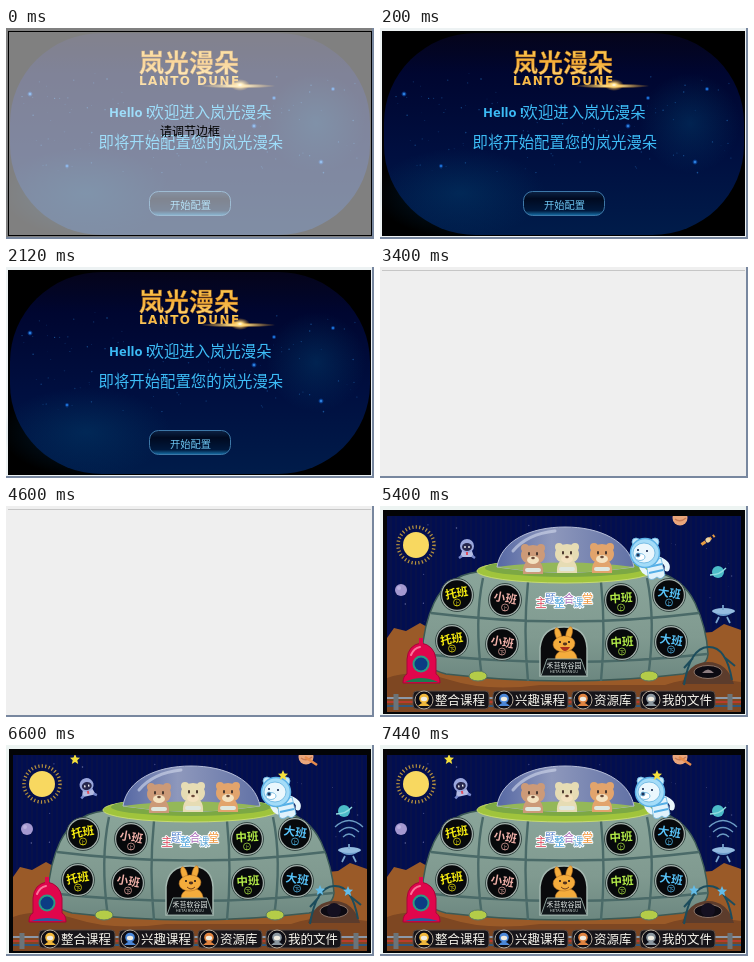
An HTML page that plays this animation: 368 px wide and 211 px high, repeating every 8 s.

```html
<!DOCTYPE html>
<html lang="zh">
<head>
<meta charset="utf-8">
<title>开始配置</title>
<style>
html, body { margin: 0; width: 100%; height: 100%; overflow: hidden; background: #efefef; }
svg { display: block; width: 100%; height: 100%; }
text { font-family: "Noto Sans CJK SC", "Noto Sans CJK", sans-serif; }
.mid { text-anchor: middle; }
.bold { font-weight: 700; }
.wide { font: 700 12px "DejaVu Sans", sans-serif; letter-spacing: 1.4px; }
.intro, .veil, .world, .poseA, .poseB { animation: 8s step-end infinite; }
.intro { animation-name: intro; }
.veil { animation-name: veil; }
.world { animation-name: world; }
.poseA { animation-name: poseA; }
.poseB { animation-name: poseB; }
@keyframes intro { 0% { opacity: 1 } 42.5%, 100% { opacity: 0 } }
@keyframes veil { 0% { opacity: 1 } 2.5%, 100% { opacity: 0 } }
@keyframes world { 0% { opacity: 0 } 67.5%, 100% { opacity: 1 } }
@keyframes poseA { 0% { opacity: 1 } 82.5%, 100% { opacity: 0 } }
@keyframes poseB { 0% { opacity: 0 } 82.5%, 100% { opacity: 1 } }
</style>
</head>
<body>
<svg viewBox="0 0 368 211" preserveAspectRatio="none">
<defs>
  <linearGradient id="night" x2="0" y2="1">
    <stop offset="0" stop-color="#05041a"/><stop offset=".2" stop-color="#000630"/>
    <stop offset=".6" stop-color="#000f40"/><stop offset="1" stop-color="#001c4a"/>
  </linearGradient>
  <radialGradient id="haze"><stop stop-color="#023a68" stop-opacity=".5"/><stop offset="1" stop-color="#023a68" stop-opacity="0"/></radialGradient>
  <radialGradient id="spark"><stop stop-color="#fff"/><stop offset=".25" stop-color="#ffe08a"/><stop offset="1" stop-color="#f0a020" stop-opacity="0"/></radialGradient>
  <radialGradient id="glow"><stop stop-color="#8cd0ff"/><stop offset=".3" stop-color="#1468d0"/><stop offset="1" stop-color="#0a3c98" stop-opacity="0"/></radialGradient>
  <linearGradient id="gold" x2="0" y2="1"><stop stop-color="#ffd960"/><stop offset=".55" stop-color="#f4ad38"/><stop offset="1" stop-color="#ffdb7c"/></linearGradient>
  <linearGradient id="key" x2="0" y2="1"><stop stop-color="#0c2244"/><stop offset=".3" stop-color="#000a20"/><stop offset=".8" stop-color="#00183c"/><stop offset="1" stop-color="#1670a8"/></linearGradient>
  <linearGradient id="hull" x2="0" y2="1"><stop stop-color="#8aa59a"/><stop offset=".6" stop-color="#809a90"/><stop offset="1" stop-color="#6c8780"/></linearGradient>
  <linearGradient id="glass"><stop stop-color="#5668a4"/><stop offset=".4" stop-color="#8e98bc"/><stop offset="1" stop-color="#6272a6"/></linearGradient>
  <pattern id="stripes" width="5" height="8" patternUnits="userSpaceOnUse"><rect width="5" height="8" fill="#020e50"/><path d="M1 0V8" stroke="#0c1444"/></pattern>
  <clipPath id="screen"><rect x="7" y="10" width="354" height="196"/></clipPath>
  <g id="pal">
    <circle cx="-8" cy="-9" r="4"/><circle cx="8" cy="-9" r="4"/>
    <path d="M-10 17Q-11 3 0 3T10 17Z"/><ellipse cy="-2" rx="12" ry="10"/>
    <ellipse cy="3" rx="6" ry="4" fill="#f4e2c0"/>
    <path d="M-4-4v1.5M4-4v1.5" stroke="#4a382e" stroke-width="2" stroke-linecap="round"/>
    <ellipse cy="1" rx="1.8" ry="1.2" fill="#6a4a38"/>
    <path d="M-6 13h12" stroke="#dfe8e0" stroke-width="4" stroke-linecap="round"/>
  </g>
  <g id="snow" stroke="#68b4e0" stroke-width=".8">
    <path d="M-3 10Q-5 16 2 20M14 6Q24 10 22 16" fill="none" stroke="#e8f6fc" stroke-width="5" stroke-linecap="round"/>
    <path d="M1 9L16 5L20 22Q16 28 12 24L9 26Q3 28 3 22Z" fill="#e0f2fb"/>
    <path d="M3 14L17 11M4 20L18 17" stroke="#54aee6" stroke-width="2"/>
    <circle cx="-9" cy="-11" r="4" fill="#c4e8fa"/><circle cx="10" cy="-11" r="4" fill="#c4e8fa"/>
    <circle r="14.5" fill="#a4dcf8" stroke="#5cb2e6" stroke-width="1.5"/>
    <ellipse cx="-1" rx="11" ry="10" fill="#eaf7fd"/>
    <ellipse cx="-5" cy="4" rx="5" ry="3.5" fill="#fff"/>
    <circle cx="-7" cy="2" r="2" fill="#20345a"/><path d="M-7-4v2M2-3v2" stroke="#20345a" stroke-width="1.7"/>
  </g>
  <g id="pilot">
    <path d="M-5 3H5L7 9H-7Z" fill="#b4bce4"/><path d="M-5 8l-3 2M5 8l3 2" stroke="#7888cc" stroke-width="2.5"/>
    <circle cy="-2" r="7" fill="#9aa6dc"/><ellipse cy="-1" rx="5" ry="4" fill="#26264c"/>
    <path d="M-2-2v2M2-2v2" stroke="#fff" stroke-width="1.3"/><path d="M0 4v3" stroke="#e05060" stroke-width="2"/>
  </g>
  <path id="star" d="M0-5L1.5-1.5 5-1.2 2.3 1.2 3.2 5 0 3-3.2 5-2.3 1.2-5-1.2-1.5-1.5Z"/>
</defs>

<rect width="368" height="211" fill="#efefef"/>
<path d="M2 3.5H365" stroke="#c6c6c6"/>

<g class="intro">
  <rect width="366" height="209" fill="#edf2f3"/>
  <rect x="2" y="3" width="363" height="205" fill="#000"/>
  <rect x="4" y="5" width="360" height="202" rx="92" ry="90" fill="url(#night)"/>
  <ellipse cx="80" cy="165" rx="85" ry="45" fill="url(#haze)"/>
  <ellipse cx="310" cy="95" rx="50" ry="50" fill="url(#haze)"/>
  <g id="stars"></g>
  <g fill="url(#gold)">
    <text x="133" y="43.5" font-size="25" class="bold" stroke="#9b5a14" stroke-width=".4">岚光漫朵</text>
    <text x="133" y="56.5" class="wide">LANTO DUNE</text>
  </g>
  <ellipse cx="232" cy="58" rx="38" ry="2.5" fill="url(#spark)"/>
  <ellipse cx="234" cy="57" rx="10" ry="6" fill="url(#spark)"/>
  <g fill="#3cbcf6" font-size="15.4" font-weight="500">
    <text x="103" y="89" style="font:700 13px 'Open Sans',sans-serif">Hello !</text>
    <text x="142.5" y="90">欢迎进入岚光漫朵</text>
    <text x="92.5" y="120">即将开始配置您的岚光漫朵</text>
  </g>
  <rect x="143.5" y="163.5" width="81" height="24" rx="9" fill="url(#key)" stroke="#3d78a8"/>
  <text x="184.5" y="181" class="mid" font-size="10.3" font-weight="500" fill="#6cc4f0">开始配置</text>
</g>

<g class="veil">
  <rect width="366" height="209" fill="#808080"/>
  <rect x="2" y="3" width="363" height="205" fill="#000"/>
  <g id="faded"></g>
  <rect x="2" y="3" width="363" height="205" fill="#fff" opacity=".5"/>
  <rect x="2.5" y="3.5" width="363" height="204" fill="none" stroke="#000"/>
  <text x="184" y="108" class="mid" font-size="12">请调节边框</text>
</g>

<g class="world">
  <rect width="366" height="209" fill="#edf4f2"/>
  <rect x="3" y="4" width="362" height="204" fill="#030406"/>
  <g clip-path="url(#screen)">
    <rect x="7" y="10" width="354" height="196" fill="url(#stripes)"/>
    <g id="dust" fill="#8d91c5"></g>
    <path d="M7 132L14 122 26 125 40 117 60 128H310L332 126 344 118 361 124V207H7Z" fill="#9a5a28"/>
    <path d="M7 172Q33 162 70 174T160 179H285Q315 168 361 176V207H7Z" fill="#7e4722"/>
    <circle cx="36" cy="39" r="18" fill="none" stroke="#b8923c" stroke-width="3.5" stroke-dasharray="1.2 2.3"/>
    <circle cx="36" cy="39" r="13" fill="#f8d860"/>
    <circle cx="300" cy="12" r="7.5" fill="#eaa67c"/><path d="M295 13Q300 17 306 12" fill="none" stroke="#c87c58" stroke-width="1.5"/>
    <circle cx="21" cy="84" r="6" fill="#a498d0"/><circle cx="19" cy="82" r="2" fill="#bcb2e0"/>
    <circle cx="338" cy="66" r="6" fill="#4cbcc8"/><path d="M330 69Q340 69 346 62" fill="none" stroke="#90dce0" stroke-width="1.3"/>

    <!-- ship -->
    <path d="M97 66C78 68 62 80 54 97C47 112 43 130 42 148Q43 162 66 168Q185 182 303 168Q327 162 328 148C327 130 322 112 315 97C307 80 292 68 273 66Z" fill="url(#hull)" stroke="#3c5a56" stroke-width="1.5"/>
    <g fill="none" stroke="#4a6a68" stroke-width="2.4">
      <path d="M51 107Q185 124 319 107M43 148Q185 164 327 148M103 72Q94 115 102 172M148 76Q143 125 148 175M221 76Q226 125 221 175M267 72Q276 115 268 172"/>
    </g>
    <g fill="#b4cc48" stroke="#5a7864"><ellipse cx="98" cy="170" rx="9" ry="5"/><ellipse cx="269" cy="170" rx="9" ry="5"/></g>
    <ellipse cx="185" cy="65" rx="88" ry="12" fill="#a0c43c" stroke="#c8dc70"/>
    <ellipse cx="185" cy="62" rx="80" ry="9" fill="#7ca844"/>
    <path d="M117 61C121 35 150 21 185 21S249 35 254 61Q185 72 117 61Z" fill="url(#glass)" stroke="#b4bcd8"/>
    <path d="M133 45Q147 28 175 25" fill="none" stroke="#ccd4ea" stroke-width="3" opacity=".65" stroke-linecap="round"/>
    <path d="M117 61Q185 52 254 61Q185 72 117 61Z" fill="#94b858"/>
    <use href="#pal" x="153" y="51" fill="#cc9a78"/>
    <use href="#pal" x="187" y="50" fill="#e6dcb4"/>
    <use href="#pal" x="222" y="50" fill="#e2a46c"/>
    <g id="keys"></g>
    <g id="title" class="mid" font-size="11" font-weight="500" paint-order="stroke" stroke="#fff" stroke-width="2" stroke-linejoin="round"></g>

    <!-- door -->
    <path d="M160 170V142Q162 121 184 121T207 142V170Z" fill="#0a0a0c" stroke="#a4b8b0" stroke-width="1.5"/>
    <g fill="#f4ac3c" stroke="#b06c24" stroke-width=".5" transform="rotate(-5 184 138)">
      <path d="M174 154Q173 145 184 144T196 154Z"/>
      <ellipse cx="179" cy="128" rx="3" ry="7" transform="rotate(-12 179 128)"/><ellipse cx="190" cy="128" rx="3" ry="7" transform="rotate(20 190 128)"/>
      <ellipse cx="184" cy="138" rx="11" ry="8"/>
    </g>
    <path d="M180 135v2M189 135v2" stroke="#30221b" stroke-width="1.7"/><ellipse cx="185" cy="138" rx="2.2" ry="1.4" fill="#51311e"/>
    <path class="poseA" d="M180 141Q185 149 190 141Z" fill="#a8301c"/>
    <path class="poseB" d="M181 142Q185 146 189 142" fill="none" stroke="#71401e"/>
    <path d="M167 153H201L207 170H161Z" fill="#11161a" stroke="#8ea29c"/>
    <text x="184" y="161.5" class="mid" font-size="7" fill="#e5ebe8">禾苔软谷园</text>
    <text x="184" y="167" class="mid" font-size="4" fill="#cbd3cf">HETAI RUANGU</text>

    <!-- capsule -->
    <path d="M23 177Q23 170 27 168V153Q28 139 41 137Q54 139 56 153V168Q60 170 60 177Z" fill="#e0064c" stroke="#a80438"/>
    <path d="M41 132v6" stroke="#e0064c" stroke-width="4"/>
    <path d="M31 149Q34 142 40 141" fill="none" stroke="#f8789c" stroke-width="2" stroke-linecap="round"/>
    <circle cx="41" cy="158" r="8.5" fill="#2c9c84"/><circle cx="41" cy="158" r="6.5" fill="#0c3c84"/>
    <path class="poseA" d="M25 176Q41 168 58 176Z" fill="#1c7c50"/>
    <path class="poseB" d="M25 176Q41 170 58 176Z" fill="#2858a0"/>

    <!-- crater -->
    <path d="M302 178Q309 156 328 156T354 178Z" fill="#5c3c2c"/>
    <ellipse cx="328" cy="166" rx="14" ry="6.5" fill="#0c0a12" stroke="#8c7468"/>
    <g fill="none" stroke="#1c4c5c" stroke-width="2">
      <path d="M304 179Q310 142 328 141T352 174M313 152L304 162M344 151L355 160"/>
    </g>
    <path class="poseA" d="M322 167Q328 160 334 167Z" fill="#8c7c80"/>
    <g class="poseB" fill="#64bce8"><use href="#star" x="314" y="145"/><use href="#star" x="342" y="146"/><circle cx="328" cy="165" r="7" fill="#141020"/></g>

    <g class="poseA">
      <use href="#pilot" x="87" y="42"/>
      <use href="#snow" x="265" y="47"/>
      <g transform="translate(328 34) rotate(-35)"><path d="M-8 0H8" stroke="#e89c40" stroke-width="3" stroke-dasharray="5 2"/><circle r="2.5" fill="#f0d4a0"/></g>
    </g>
    <g class="poseB">
      <use href="#pilot" transform="translate(81 42) rotate(-12)"/>
      <use href="#snow" x="270" y="47"/>
      <g fill="#f4e03c"><use href="#star" x="69" y="14"/><use href="#star" x="277" y="30"/></g>
      <path d="M299 12L311 20" stroke="#e88c4c" stroke-width="2.5"/>
      <path d="M337 92Q343 86 349 92M333 87Q343 78 353 87M329 82Q343 69 357 82" fill="none" stroke="#6c9cc4" stroke-width="1.2"/>
    </g>
    <path d="M332 105Q343 115 355 105Z" fill="#6c9ccc"/><ellipse cx="343.5" cy="105" rx="11.5" ry="3" fill="#94bce0"/>
    <path d="M343 99v5M339 111l-3 6M347 111l3 6" stroke="#7ca8d0" stroke-width="1.7"/>

    <path d="M7 192H361" stroke="#8c98a8" stroke-width="2"/><path d="M7 196H361" stroke="#b83c2c" stroke-width="2"/><path d="M7 200H361" stroke="#30587c" stroke-width="2"/>
    <path d="M16 188v16M350 188v16" stroke="#6c7478" stroke-width="5"/>
    <g id="menu"></g>
  </g>
</g>
<path d="M367 0V211M0 210H368" stroke="#78879f" stroke-width="2"/>
</svg>

<script>
const get = id => document.getElementById(id);

let seed = 17;
const rand = () => (seed = seed * 16807 % 2147483647) / 2147483647;
const dots = (n, x, y, w, h, size) => Array.from({ length: n }, () =>
  `<circle cx="${x + rand() * w}" cy="${y + rand() * h}" r="${size * (.4 + rand() * .6)}" opacity="${.25 + rand() * .6}"/>`).join("");

const bright = [[24, 66, 3], [61, 138, 2.5], [315, 134, 3], [248, 98, 3], [268, 70, 2.5], [327, 61, 2.5]];
get("stars").innerHTML = `<g fill="#1c60a8">${dots(110, 16, 45, 336, 100, .8)}</g>` +
  bright.map(([x, y, r]) => `<circle cx="${x}" cy="${y}" r="${r}" fill="url(#glow)"/>`).join("");
get("dust").innerHTML = dots(45, 8, 11, 350, 105, .8);
get("faded").append(...[...document.querySelector(".intro").children].slice(2).map(el => {
  const copy = el.cloneNode(true);
  copy.removeAttribute("id");
  return copy;
}));

const rooms = [
  ["托班", "#f8ee10", -10, 77, 89, 72, 135],
  ["小班", "#f0b0a8", 10, 125, 94, 122, 138],
  ["中班", "#b4ec48", -4, 241, 94, 242, 138],
  ["大班", "#58c4fa", 8, 289, 89, 291, 136]
];
const room = (name, color, turn, x, y, mark) => `<g transform="translate(${x} ${y})">
  <circle r="16.5" fill="#a4b0ac" stroke="#384c48"/><circle r="14.8" fill="#07090b"/>
  <text class="mid bold" y="2" font-size="11.5" fill="${color}" transform="rotate(${turn})">${name}</text>
  <circle cy="7.5" r="3.5" fill="none" stroke="${color}" stroke-width=".7"/>
  <text class="mid" y="9.5" font-size="5" fill="${color}">${mark}</text></g>`;
get("keys").innerHTML = rooms.map(([name, color, turn, x1, y1, x2, y2]) =>
  room(name, color, turn, x1, y1, "上") + room(name, color, turn, x2, y2, "下")).join("");

const hues = ["#e0485c", "#5c88d0", "#4ca4dc", "#a868b8", "#60a8d8", "#f09030"];
get("title").innerHTML = [..."主题整合课堂"].map((c, i) =>
  `<text x="${161 + i * 9.3}" y="${i % 2 ? 97 : 101}" fill="${hues[i]}">${c}</text>`).join("");

const tabs = [["整合课程", 33, 76, "#f0b83c"], ["兴趣课程", 113, 75, "#4c88d8"], ["资源库", 192, 64, "#e08440"], ["我的文件", 260, 75, "#8c98a0"]];
get("menu").innerHTML = tabs.map(([name, x, w, color]) => `<g transform="translate(${x} 0)">
  <rect y="185" width="${w}" height="18" rx="4" fill="#17151a" stroke="#5c4c44"/>
  <circle cx="11" cy="194" r="9" fill="#0c0c14" stroke="#b4a898"/>
  <path d="M5 200Q11 193 17 200Z" fill="${color}"/>
  <circle cx="11" cy="192.5" r="4.8" fill="${color}"/><ellipse cx="11" cy="193" rx="3.2" ry="2.2" fill="#f0ece0"/>
  <text x="22" y="199" font-size="12.5" font-weight="500" fill="#f8f6ee">${name}</text></g>`).join("");
</script>
</body>
</html>
```
